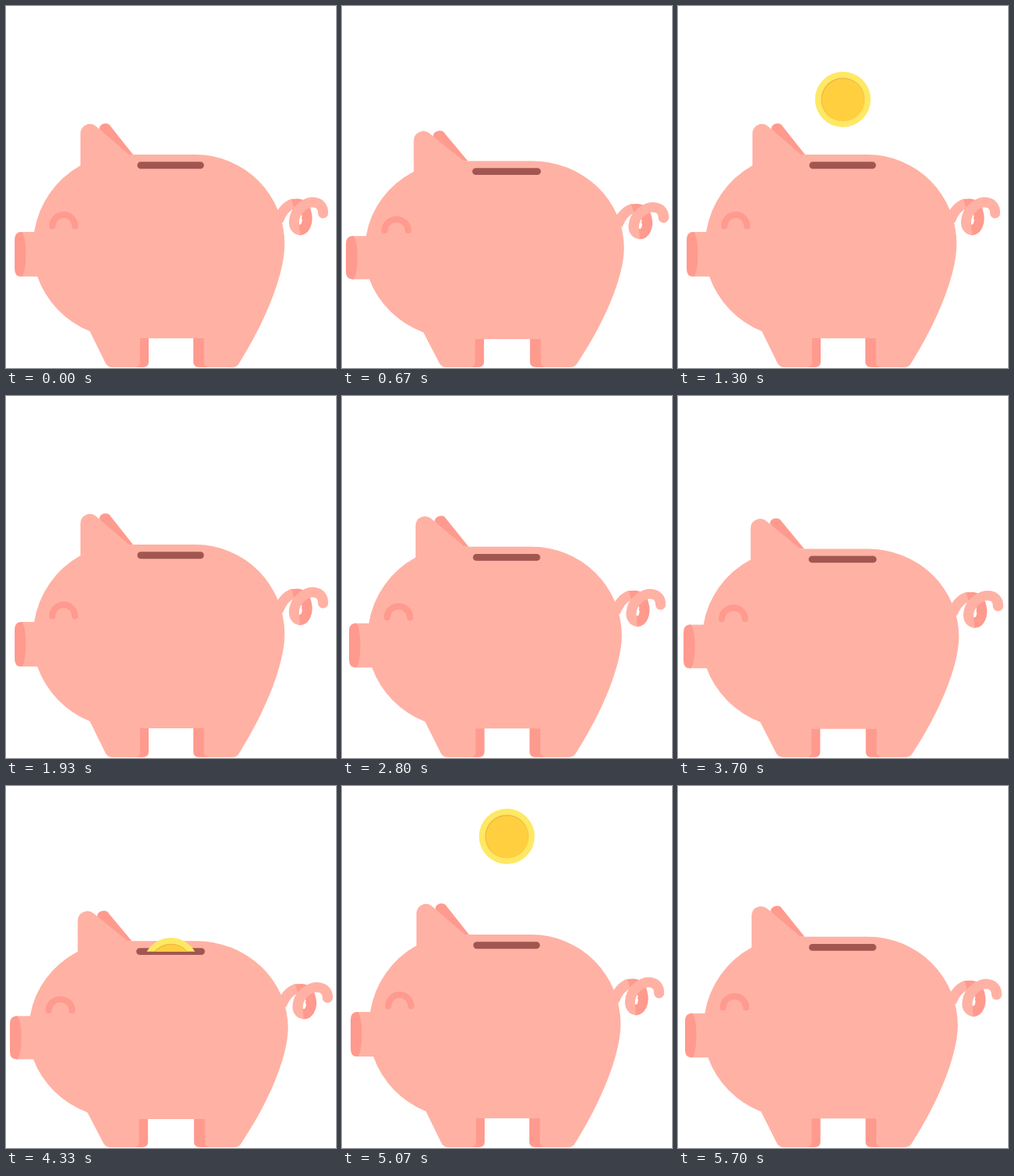
An HTML page that plays this animation: 421 by 463 pixels, repeating every 5.73 s.

```html
<!DOCTYPE html>
<html lang="en">
<head>
<meta charset="utf-8">
<title>Piggy bank</title>
<style>
  html, body { margin: 0; width: 100%; height: 100%; overflow: hidden; background: #fff; }
  svg { display: block; width: 421px; height: 463px; }
  .light { fill: #ffb1a4; }
  .dark { fill: #ff9a8e; }
  .line { fill: none; stroke-width: 13; }
  .line.light { stroke: #ffb1a4; }
  .line.dark { stroke: #ff9a8e; }
  .line.light, .line.dark { fill: none; }
</style>
</head>
<body>
<svg viewBox="0 0 421 463">
  <clipPath id="aboveSlot"><rect id="clip" width="421" height="204"/></clipPath>

  <g id="pig">
    <!-- tail -->
    <path class="line dark" d="M364 253.5C367 253 369 253 372 253C384 254 386 272 382.5 280C380 286 377 287 374 286.5"/>
    <path class="line light" d="M347 275C353 260 359 255 366 253"/>
    <path class="line light" stroke-linecap="round" d="M374.500 286.500C364 285 366 267 376 258C387 247 405 249 404.500 265"/>
    <path class="line dark" stroke-linecap="butt" d="M383.500 270C384 280 381 286 374.500 286.500"/>
    <ellipse cx="376" cy="275.500" rx="1.700" ry="4" transform="rotate(12 376 275)" fill="#fff"/>

    <!-- far ear and legs -->
    <path class="dark" d="M119 157A8 8 0 0 1 134 154.500L162 190H140Z"/>
    <path class="dark" d="M160 420H182V455Q182 462 175 462H160Z"/>
    <path class="dark" d="M239 420H262V462H246Q239 462 239 455Z"/>

    <!-- body -->
    <path class="light" d="M95 204V163A12 12 0 0 1 115 154L157 190H242
      A114 115 0 0 1 355.500 305C355 345 330 405 298 456Q295 462 289 462
      H259Q252.500 462 252.500 455V425H171V455Q171 462 164 462
      H135Q130 462 127 457L107 416A118 118 0 0 1 40 346H18V289H36
      A118 118 0 0 1 95 204Z"/>
    <path class="dark" d="M20 289H18Q11 290 11 299V336Q11 346 19 346H20C27 340 27 295 20 289Z"/>
    <path class="line dark" style="stroke-width:8" stroke-linecap="round" d="M59 281.500A14.500 14.500 0 0 1 88 281.500"/>
    <path stroke="#a25650" stroke-width="9" stroke-linecap="round" d="M172 203.800H248"/>
  </g>

  <g clip-path="url(#aboveSlot)">
    <g id="coin">
      <circle r="35.500" fill="#ffe863"/>
      <circle r="27.800" fill="#edbc45"/>
      <circle cx=".4" cy=".7" r="27" fill="#ffcf40"/>
    </g>
  </g>
</svg>
<script>
  const LOOP = 5730, STEPS = 12, GROUND = 462, SLOT = 204;
  const pig = document.getElementById('pig');
  const coin = document.getElementById('coin');
  const clip = document.getElementById('clip');

  // A deep dip as the coin lands, then a shallow second one.
  function squashAt(step) {
    const deep = 0.06 - 0.03 * Math.abs(step - 7);
    const shallow = step > 9 ? 0.01 * (STEPS - step) : 0;
    return Math.max(0, deep, shallow);
  }

  function draw(time) {
    // Poses last 80 ms each, shown on a 30 fps clock.
    const tick = Math.floor((time + 5) * 0.03);
    const step = Math.floor(tick * 5 / 12) % STEPS;
    const squash = squashAt(step);

    pig.setAttribute('transform',
      `translate(211 ${GROUND}) scale(${1 + squash} ${1 - squash}) translate(-211 ${-GROUND})`);
    clip.setAttribute('height', GROUND - (GROUND - SLOT) * (1 - squash));
    coin.setAttribute('transform', `translate(210.300 ${9.5 + 55 * (step - 2)})`);
    coin.setAttribute('visibility', step >= 2 && step <= 6 ? 'visible' : 'hidden');
  }

  const start = performance.now();
  function play() {
    draw((performance.now() - start) % LOOP);
    requestAnimationFrame(play);
  }
  play();
</script>
</body>
</html>
```
